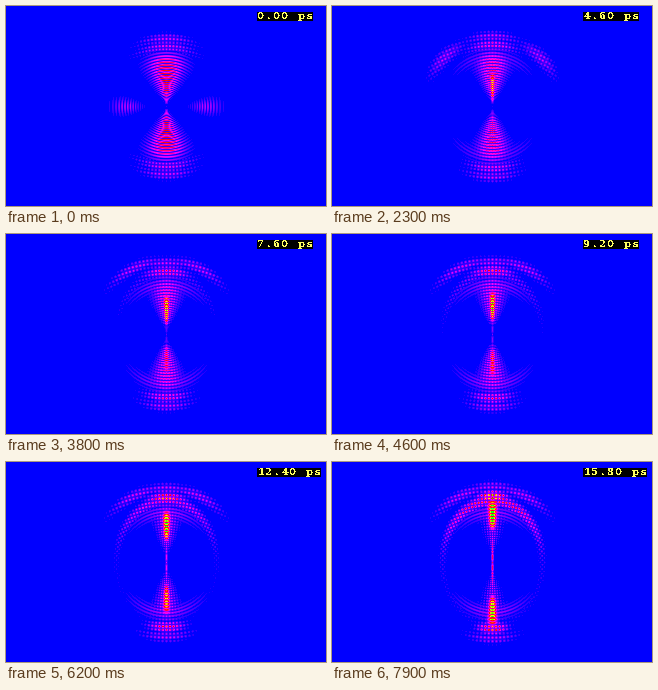
A matplotlib script that plays this animation: 320 by 200 pixels, repeating every 8000 ms.

```python
import numpy as np
import matplotlib.pyplot as plt
from matplotlib.animation import FuncAnimation
from matplotlib.colors import hsv_to_rgb

W, H, DPI = 320, 200, 100
FRAMES, INTERVAL = 80, 100
PS_PER_FRAME = 0.2
SPAN = FRAMES * PS_PER_FRAME
CELL, TEXT_X, BASELINE = 8, 251, 13

# Stage coordinates centred on the nucleus, mirrored about the field axis
ys, xs = np.mgrid[0:H, 0:W]
X = np.abs(xs - 160.0)
Z = 100.0 - ys
R = np.hypot(X, Z)
THETA = np.degrees(np.arctan2(X, Z))

# Standing waves: shells in radius, mesh in parabolic coordinates
WAVE = 10


def fringe(q):
    return np.cos(WAVE * np.sqrt(np.maximum(q, 0))) ** 2


SHELL = 0.1 + 0.9 * fringe(2 * R)
MESH = 0.15 + 0.85 * fringe(R + Z) * fringe(R - Z)
CORE = 0.4 + 0.6 * fringe(2 * R)


def mix(a, b, k):
    return a + (b - a) * k


def bell(x, center, width, power=2):
    return np.exp(-np.abs((x - center) / width) ** power)


def pole(sign, k):
    """Layers of the upper (+1) or lower (-1) half at progress k."""
    up = sign > 0
    height = sign * Z
    angle = THETA if up else 180 - THETA
    late = k * k

    cone = (mix(0.35, 0.18, k) * bell(R, mix(29, 38, k), 24, 4)
            * bell(angle, 0, mix(23, 14, k)) * mix(SHELL, MESH, k))
    arc = (0.12 * min(3 * k, 1) * bell(R, 50, 7)
           * bell(angle, 0, 40) * SHELL)
    band = (mix(0.23, 0.78 if up else 0.55, late) * bell(R, mix(60, 66, k), 5)
            * bell(angle, 0, mix(25, 11, k)) * MESH)
    halo = (0.19 * bell(R, mix(68, 76, k), 5)
            * bell(angle, 0, mix(22, 17, k)) * MESH)

    # The core drifts outward and widens away from the nucleus
    glow = mix(0.2, 0.82, np.sqrt(k)) if up else 0.72 * k
    core = (glow * bell(height, mix(18, 49, late), 14, 4)
            * bell(X, 0, 1 + 0.055 * R) * CORE)
    return [cone, arc, band, halo, core]


def wings(t):
    """Side lobes swept up by the field into an arc over the top."""
    k = min(t / 6.5, 1)
    s = np.sqrt(k)
    return (mix(0.14, 0.2, k) * bell(R, mix(40, 74, s), mix(14, 5, s))
            * bell(THETA, mix(90, 25, k), mix(10, 22, k))
            * mix(SHELL, MESH, s))


def oval(k):
    """Closed orbit that appears late, brightest near the top."""
    ring = bell(np.hypot(X / 50, Z / 62), 1, 0.08)
    top = np.cos(np.radians(THETA / 2)) ** 8
    return k * k * (0.04 + 0.4 * top) * ring * MESH


def density(t):
    k = t / SPAN
    axis = 0.28 * k * k * bell(X, 0, 1) * bell(Z, 0, 28, 4) * CORE
    layers = pole(1, k) + pole(-1, k) + [wings(t), oval(k), axis]
    v = np.max(layers, axis=0)
    return np.where(v < 0.02, 0, np.minimum(v, 0.85))


def colorize(v):
    """Hue runs blue, magenta, red, yellow, green, cyan."""
    one = np.ones_like(v)
    return hsv_to_rgb(np.dstack([(2 / 3 + v) % 1, one, one]))


fig = plt.figure(figsize=(W / DPI, H / DPI), dpi=DPI, facecolor="blue")
ax = fig.add_axes([0, 0, 1, 1])
ax.axis("off")
image = ax.imshow(np.zeros((H, W, 3)), extent=(0, W, H, 0),
                  interpolation="nearest", aspect="auto")

# Clock on a fixed character grid
clock = [ax.text(TEXT_X + CELL * (i + 0.5), BASELINE, "", ha="center",
                 va="baseline", family="DejaVu Serif", weight="bold",
                 size=7.2, color="#ffff60", antialiased=False)
         for i in range(8)]


def draw(i):
    t = i * PS_PER_FRAME
    label = f"{t:.2f} ps"
    rgb = colorize(density(t))
    rgb[6:15, TEXT_X:TEXT_X + CELL * len(label)] = 0
    image.set_data(rgb)
    for cell, char in zip(clock, label.ljust(len(clock))):
        cell.set_text(char)
    return image, *clock


anim = FuncAnimation(fig, draw, frames=FRAMES, interval=INTERVAL,
                     repeat=True, repeat_delay=0)
plt.show()
```
